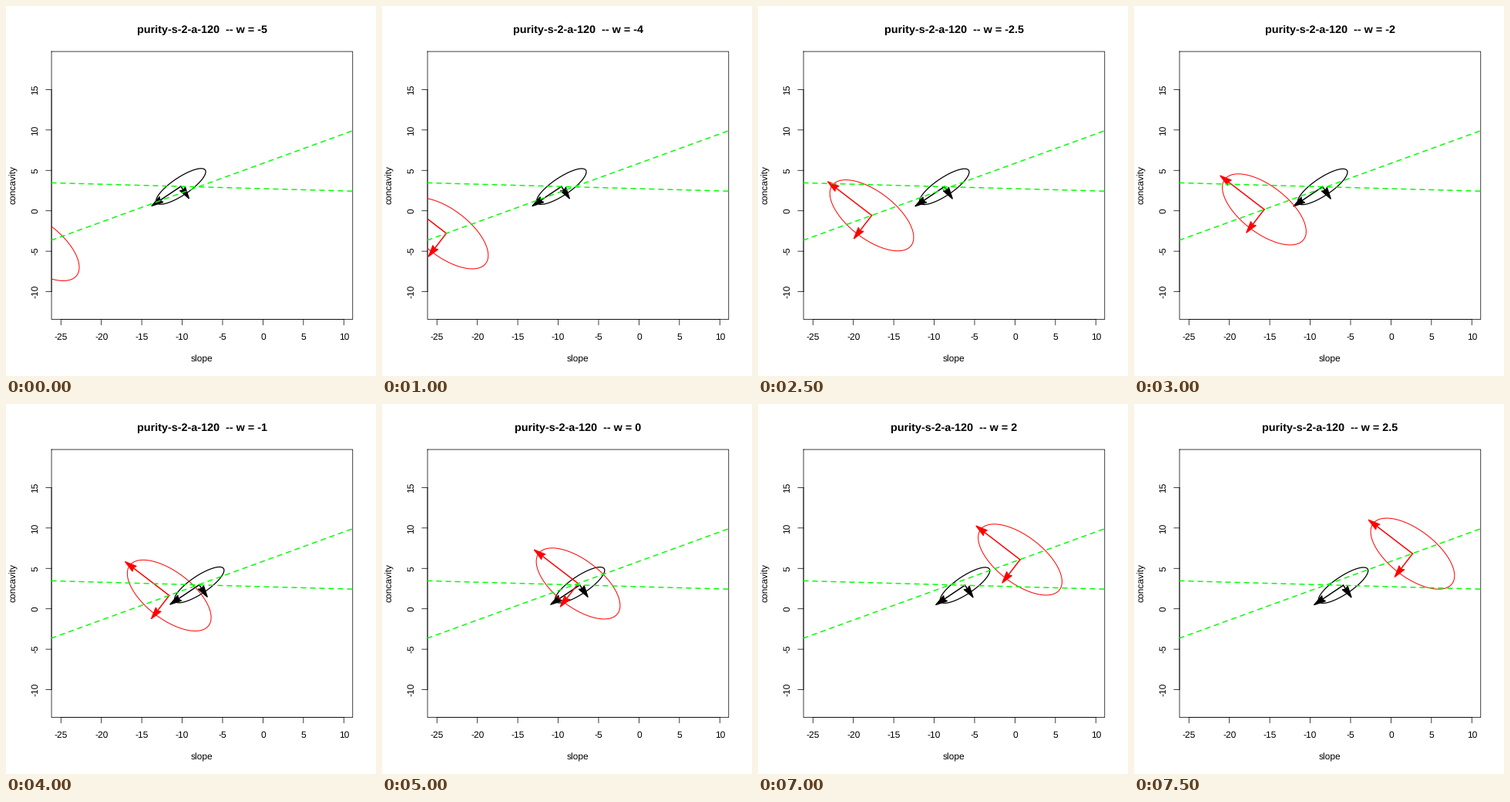
Write a matplotlib script that moves like this. It is 480 px wide and 480 px high and loops after 8000 ms.

```python
import numpy as np
import matplotlib.pyplot as plt
from matplotlib.animation import FuncAnimation
from matplotlib.patches import Polygon, Rectangle

plt.rcParams["font.family"] = "Liberation Sans"
plt.rcParams["text.hinting"] = "none"

SIZE, DPI = 480, 72          # one point equals one pixel
FRAMES, STEP_MS = 16, 500
LEFT, RIGHT, TOP, BOTTOM = 59.04, 449.76, 59.04, 406.56
MID_X, MID_Y = 254.4, 232.8
UNIT = 10.486                # pixels per data unit on both axes
GREEN = "#00ff00"

fig = plt.figure(figsize=(SIZE / DPI, SIZE / DPI), dpi=DPI, facecolor="white")
ax = fig.add_axes([0, 0, 1, 1])
ax.set_xlim(0, SIZE)
ax.set_ylim(SIZE, 0)
ax.axis("off")
clip = Rectangle((LEFT, TOP), RIGHT - LEFT, BOTTOM - TOP,
                 transform=ax.transData)


def px(x):
    return 333.4 + UNIT * x


def py(y):
    return 265.7 - UNIT * y


def line(xs, ys, color="black", width=0.75, clipped=False, **kw):
    artist, = ax.plot(xs, ys, color=color, lw=width, snap=False, **kw)
    if clipped:
        artist.set_clip_path(clip)
    return artist


def label(x, y, text, size=12, **kw):
    return ax.text(x, y, text, fontsize=size, ha="center", va="baseline",
                   rotation_mode="anchor", **kw)


# Arrow head along +x: straight sides, shallow notch, centred on the origin
HEAD = np.array([[7.3, 0], [-7.3, 4], [-6.2, 2], [-5.8, 0],
                 [-6.2, -2], [-7.3, -4]])


class Arrow:
    def __init__(self, vec, color, z):
        self.vec = np.array(vec)
        u = self.vec / np.hypot(*self.vec)
        self.head = HEAD @ np.array([[u[0], u[1]], [-u[1], u[0]]])
        self.shaft = line([], [], color, 1.5, True, zorder=z)
        self.tip = Polygon(self.head, closed=True, fc=color, ec=color, lw=1.5,
                           joinstyle="round", zorder=z)
        ax.add_patch(self.tip)
        self.tip.set_clip_path(clip)

    def move(self, start):
        end = start + self.vec
        self.shaft.set_data([start[0], end[0]], [start[1], end[1]])
        self.tip.set_xy(self.head + end)


class Ellipse:
    """Ellipse with its two principal axes, sliding along a straight path."""

    def __init__(self, centre, velocity, major, minor, color, width, z):
        self.centre, self.velocity = np.array(centre), np.array(velocity)
        t = np.linspace(0, 2 * np.pi, 181)
        self.shape = np.outer(np.cos(t), major) + np.outer(np.sin(t), minor)
        self.ring = line([], [], color, width, True, zorder=z)
        self.arrows = [Arrow(v, color, z) for v in (major, minor)]

    def move(self, w):
        c = self.centre + w * self.velocity
        self.ring.set_data(*(self.shape + c).T)
        for arrow in self.arrows:
            arrow.move(c)


# Box, axes with ticks, and labels
line([LEFT, RIGHT, RIGHT, LEFT, LEFT], [TOP, TOP, BOTTOM, BOTTOM, TOP],
     solid_joinstyle="miter", zorder=1)
line([px(-25), px(10)], [BOTTOM, BOTTOM], zorder=1)
line([LEFT, LEFT], [py(-10), py(15)], zorder=1)
for v in range(-25, 11, 5):
    line([px(v)] * 2, [BOTTOM, BOTTOM + 7.2], zorder=1)
    label(px(v), 432.7, str(v))
for v in range(-10, 16, 5):
    line([LEFT, LEFT - 7.2], [py(v)] * 2, zorder=1)
    label(41.4, py(v), str(v), rotation=90)
label(MID_X, 461.6, "slope")
label(13, MID_Y - 0.4, "concavity", rotation=90)
title = label(MID_X, 34.8, "", 14.4, weight="bold")

black = Ellipse((256.6, 234.8), (5.95, 0.16), (-31.6, 21.2), (6.35, 9.47),
                "black", 1.25, 3)
red = Ellipse((254.5, 232.9), (42.77, -15.5), (-51.1, -39.2), (-18.6, 24.2),
              "red", 1.0, 4)

for y0, y1 in ((303.8, 161.8), (229.4, 240.2)):
    line([LEFT, RIGHT], [y0, y1], GREEN, 1.5, True, zorder=5,
         dashes=(4, 4), dash_capstyle="round")


def update(i):
    w = -5 + 0.5 * i
    title.set_text(f"purity-s-2-a-120  -- w = {w:g}")
    black.move(w)
    red.move(w)
    return []


anim = FuncAnimation(fig, update, frames=FRAMES, interval=STEP_MS,
                     repeat=True, repeat_delay=0, blit=False)
plt.show()
```
